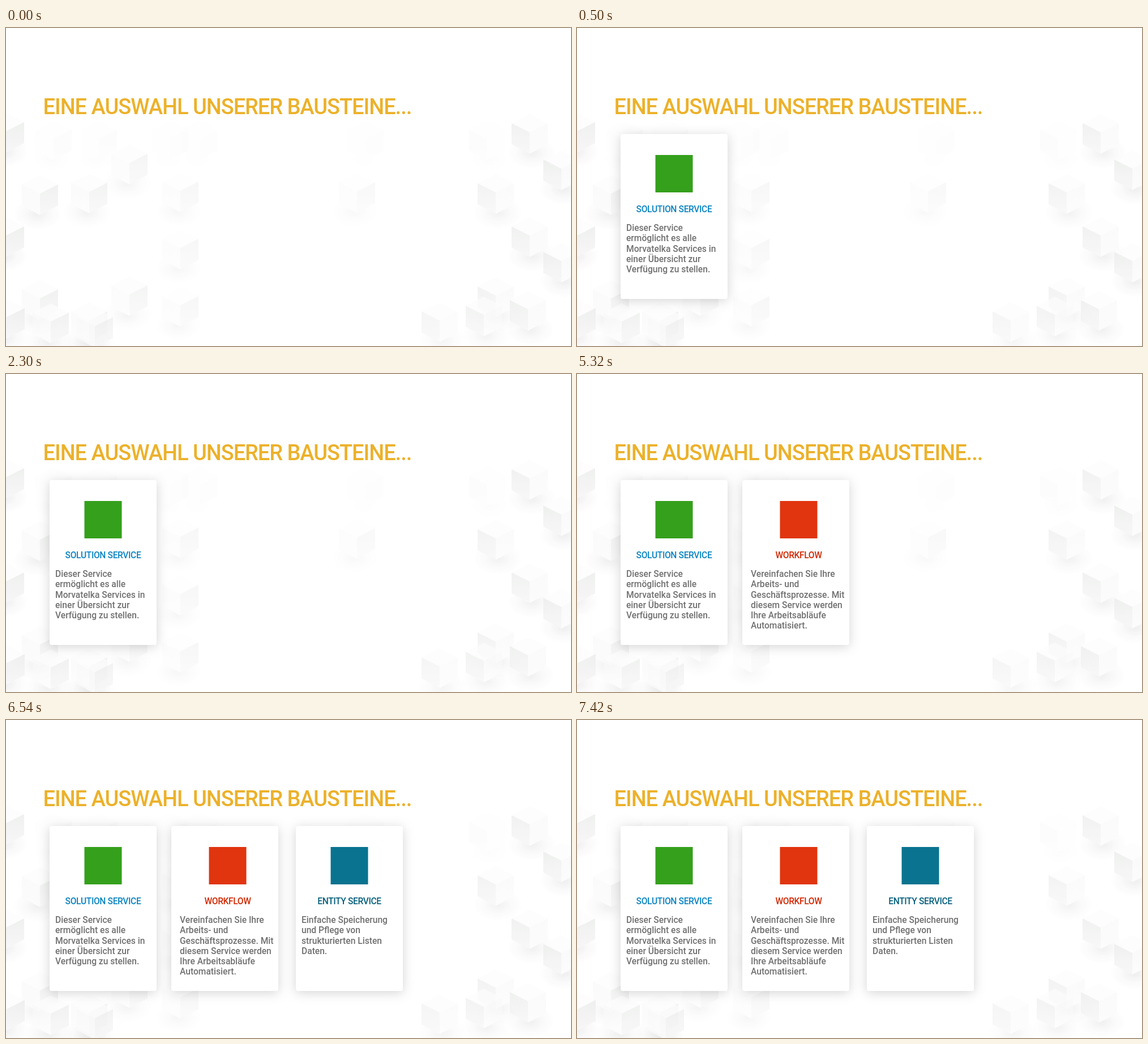
Recreate the animation shown at these times as an HTML page. Size 998 by 561 pixels, loop 8000 ms.

```html
<!DOCTYPE html>
<html lang="de">
<head>
<meta charset="utf-8">
<title>Bausteine</title>
<style>
  html, body { margin: 0; width: 100%; height: 100%; overflow: hidden; background: #fff; }
  svg { display: block; width: 100vw; height: 100vh; }
  text { font: 500 15.6px Roboto, sans-serif; }
  .heading { font-size: 38px; letter-spacing: -1.03px; fill: #ecb12a; }
  .name { letter-spacing: -.36px; text-anchor: middle; }
  .body { fill: #707070; }
  .card { fill: #fff; filter: drop-shadow(0 3px 10px rgba(0, 0, 0, .17)); }
</style>
</head>
<body>
<svg viewBox="0 0 998 561">
  <defs>
    <radialGradient id="shade">
      <stop offset="0" stop-opacity=".08"/>
      <stop offset=".5" stop-opacity=".03"/>
      <stop offset="1" stop-opacity="0"/>
    </radialGradient>
    <linearGradient id="dark" x2="0" y2="1">
      <stop offset="0" stop-color="#eceeec"/>
      <stop offset="1" stop-color="#f6f6f6"/>
    </linearGradient>
    <linearGradient id="light" x2="0" y2="1">
      <stop offset="0" stop-color="#f9f9f9"/>
      <stop offset="1" stop-color="#fcfcfc"/>
    </linearGradient>
    <g id="cube">
      <ellipse cx="-4" cy="36" rx="46" ry="30" fill="url(#shade)"/>
      <path d="M0 0L-32-16 0-32 32-16Z" fill="#fdfdfd"/>
      <path d="M0 0L-32-16V21L0 38Z" fill="url(#light)"/>
      <path d="M0 0L32-16V21L0 38Z" fill="url(#dark)"/>
    </g>
  </defs>
  <g id="backdrop"></g>
  <text class="heading" x="65.5" y="151.5">EINE AUSWAHL UNSERER BAUSTEINE...</text>
  <g id="cards"></g>
</svg>
<script>
const LOOP = 8000, WIDTH = 998, LINE_HEIGHT = 18.25;

// Each column of cubes: x, first y, vertical step
const columns = [
  [0, 182, 184], [60, 292, 185], [147, 289, 227], [218, 238, 232], [308, 287, 101],
  [620, 288, 300], [865, 290, 182], [925, 184, 182], [981, 248, 163]
];
const faintRow = [84, 164, 290, 342, 635, 850];

const cards = [
  { start: 500, x: 77, textX: 87, color: "#0a84c1", icon: "#35a01c", name: "SOLUTION SERVICE",
    lines: ["Dieser Service", "ermöglicht es alle", "Morvatelka Services in", "einer Übersicht zur", "Verfügung zu stellen."] },
  { start: 3500, x: 292, textX: 307, color: "#d12700", icon: "#e0350f", name: "WORKFLOW",
    lines: ["Vereinfachen Sie Ihre", "Arbeits- und", "Geschäftsprozesse. Mit", "diesem Service werden", "Ihre Arbeitsabläufe", "Automatisiert."] },
  { start: 6540, x: 512, textX: 522, color: "#055f7c", icon: "#0a7390", name: "ENTITY SERVICE",
    lines: ["Einfache Speicherung", "und Pflege von", "strukturierten Listen", "Daten."] }
];

const byId = id => document.getElementById(id);

// Cubes fade towards the middle, and the right half is mirrored
function cube(x, y, strength = 1) {
  const edge = Math.abs(2 * x / WIDTH - 1);
  const side = x < 650 ? 1 : -1;
  return `<use href="#cube" opacity="${strength * (.2 + .65 * edge)}" transform="translate(${x} ${y}) scale(${side} 1)"/>`;
}

function backdrop() {
  let cubes = faintRow.map(x => cube(x, 195, .25)).join("");
  for (const [x, top, step] of columns)
    for (let y = top; y < 520; y += step) cubes += cube(x, y);
  for (let i = 0; i < 3; i++)
    cubes += cube(1 + 78 * i, 510 + 8 * i) + cube(766 + 78 * i, 516 - 10 * i);
  return cubes;
}

function card({ x, textX, color, icon, name, lines }) {
  const middle = textX + 84.5;
  const body = lines.map((line, i) =>
    `<text class="body" x="${textX}" y="${358 + i * LINE_HEIGHT}">${line}</text>`);
  return `<g>
    <rect class="card" x="${x}" y="187" width="189" height="291" rx="4"/>
    <rect x="${middle - 33}" y="224" width="66" height="66" fill="${icon}"/>
    <text class="name" x="${middle}" y="324.5" fill="${color}">${name}</text>
    ${body.join("")}
  </g>`;
}

byId("backdrop").innerHTML = backdrop();
byId("cards").innerHTML = cards.map(card).join("");
const groups = [...byId("cards").children];

function draw() {
  const time = performance.now() % LOOP;
  groups.forEach((group, i) => {
    group.style.visibility = time >= cards[i].start ? "visible" : "hidden";
  });
  requestAnimationFrame(draw);
}
draw();
</script>
</body>
</html>
```
